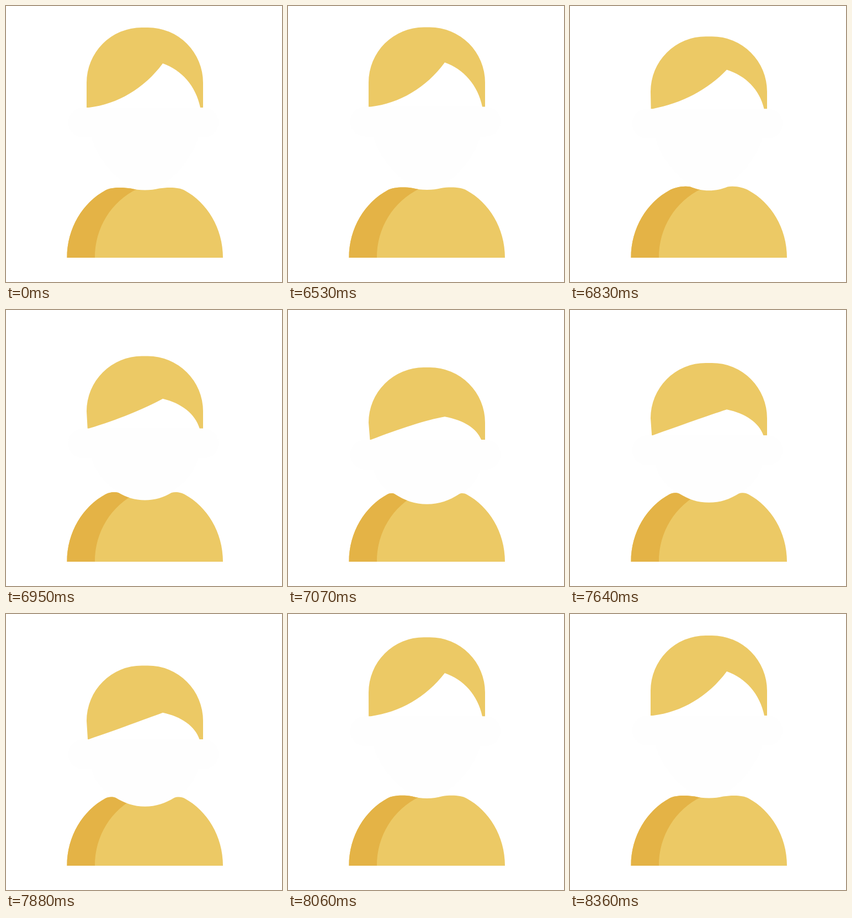
Write an HTML page that moves like this. It is 500 px wide and 500 px high and loops after 8.39 s.

```html
<!DOCTYPE html>
<html lang="en">
<head>
<meta charset="utf-8">
<title>Nodding figure</title>
<style>
html, body { margin: 0; width: 100%; height: 100%; overflow: hidden; background: #fff; }
svg { display: block; width: 100%; height: 100%; }
</style>
</head>
<body>
<svg viewBox="0 0 500 500">
  <clipPath id="clip"><path class="body"/></clipPath>
  <path id="face" fill="#fefefe"/>
  <path class="body" fill="#ecc965"/>
  <path clip-path="url(#clip)" fill="#e4b346" d="M100 300H238V331C190 355 161 402 161 456H100Z"/>
  <path id="hair" fill="#ecc965"/>
</svg>
<script>
const LOOP = 8390, START = 6530, STEP = 30, MID = 251.75, REST = 39;

// Turning points of the double nod: time, top of the hair, extra hair length
const TURNS = [
  [6500, REST, 14], [6660, 34, 0], [7130, 107, 0], [7450, 77, 0],
  [7775, 107, 0], [8150, 32, 14], [8360, REST, 14]
];

const ease = u => (1 - Math.cos(Math.PI * u)) / 2;
const mix = (a, b, u) => a + (b - a) * u;

function nodAt(t) {
  const next = TURNS.findIndex(k => k[0] > t);
  if (next < 1) return TURNS[0].slice(1);
  const a = TURNS[next - 1], b = TURNS[next];
  const u = ease((t - a[0]) / (b[0] - a[0]));
  return [mix(a[1], b[1], u), mix(a[2], b[2], u)];
}

// h is the height of the fringe, which flattens as the head tips forward
function hairPath(top, low, h) {
  const part = low - h, tilt = 80 - h;
  const left = 146 + tilt * .066, right = 352 - tilt * .05;
  const bend = 6 + (h - 42) * 1.05, tail = 20 - (h - 42) * .36;
  return `M${left} ${low}L146 ${top + 100}A100 100 0 0 1 246 ${top}H257
    A100 100 0 0 1 357 ${top + 100}V${low}H${right}
    C${right - 8} ${low - h * .49} 318 ${part + h * .15} 284 ${part}
    C250 ${part + bend} 202 ${low - tail} 150 ${low}Z`;
}

// Left half from hem to chin, then its mirror image; (x, y) is the collar
function bodyPath(chin, x, y) {
  const d = x - 180, w = MID - x, h = chin - y;
  const half = [
    [110.5, 456], [110.5, 402], [139.5, 356], [180, 334],
    [180 + d * .22, 334 - d * .13], [x - d * .35, y - 2.5], [x, y],
    [x + w * .3, y + h * .62], [MID - w * .38, chin], [MID, chin]
  ];
  const mirror = half.slice(0, -1).reverse().map(([px, py]) => [2 * MID - px, py]);
  const [first, ...rest] = half.concat(mirror);
  return `M${first}C${rest.join(" ")}Z`;
}

function facePath(low, chin) {
  const jaw = low + 54;
  return `M140 ${low}H358A27 27 0 0 1 358 ${jaw}H348
    C338 ${jaw + 40} 290 ${chin} ${MID} ${chin}
    C213 ${chin} 165 ${jaw + 40} 155 ${jaw}H140A27 27 0 0 1 140 ${low}Z`;
}

const face = document.getElementById("face");
const hair = document.getElementById("hair");
const bodies = document.querySelectorAll(".body");

function draw(now) {
  let t = now % LOOP;
  t = t < START ? 0 : START + Math.floor((t - START) / STEP) * STEP;
  const [top, stretch] = nodAt(t);
  const drop = top - REST;
  const low = top + 131 + stretch;
  const chin = 333.5 + (low - 184) * .356;
  const body = bodyPath(chin, 226 - drop * .5, chin - 3 - drop * .235);

  face.setAttribute("d", facePath(low, chin));
  hair.setAttribute("d", hairPath(top, low, 80 - drop * .585));
  bodies.forEach(el => el.setAttribute("d", body));
}

const begin = performance.now();
function tick() {
  draw(performance.now() - begin);
  requestAnimationFrame(tick);
}
tick();
</script>
</body>
</html>
```
